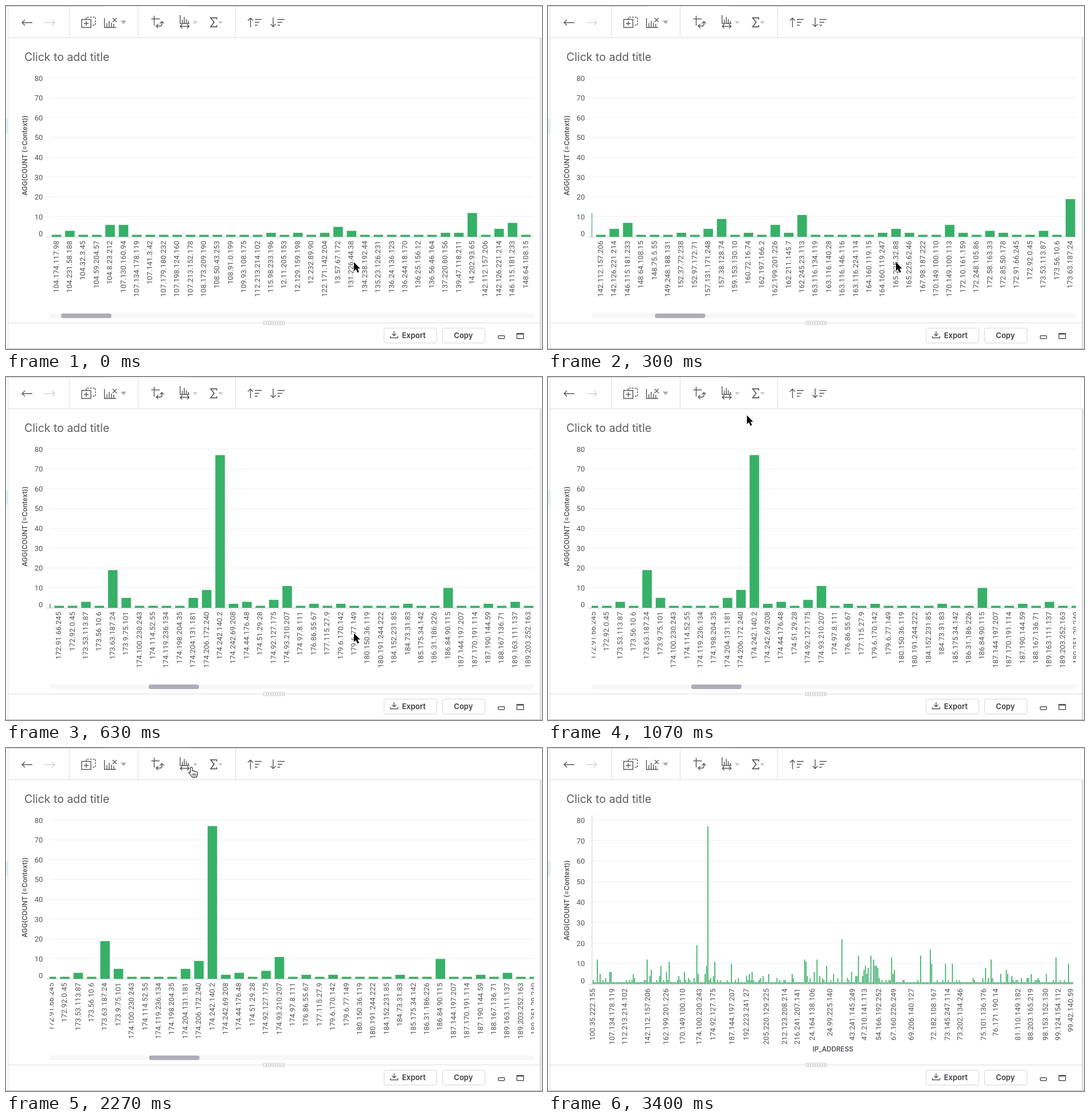
An HTML page for the animation above (3.92 s loop, 935 by 599 pixels).

```html
<!DOCTYPE html>
<html lang="en">
<head>
<meta charset="utf-8">
<title>Bar chart fit</title>
<style>
  html, body { margin: 0; width: 100%; height: 100%; overflow: hidden; background: #fff; }
  svg { display: block; width: 100vw; height: 100vh; }
  .num { font: 13px Roboto, Arial, sans-serif; fill: #55565d; }
  .axis { font: 600 11.6px Inter, Arial, sans-serif; fill: #55565d; text-anchor: middle; }
  .btn { font: 600 13px Inter, Arial, sans-serif; fill: #3c3d44; }
  .title { font: 19.5px Inter, Arial, sans-serif; fill: #5d5e66; }
  .end { text-anchor: end; }
  .icon { fill: none; stroke: #55565d; stroke-width: 1.4; }
  .rule { stroke: #dedee1; }
  .grid { stroke: #f0f0f2; }
  .base { stroke: #cdced2; }
  .box { fill: #fff; stroke: #d6d6da; }
</style>
</head>
<body>
<svg viewBox="0 0 935 599" preserveAspectRatio="none">
  <defs>
    <clipPath id="plot"><rect x="76" y="100" width="845" height="430"/></clipPath>
  </defs>
  <rect width="935" height="599" fill="#fff"/>

  <g id="frame">
    <rect y="197" width="3" height="26" fill="#e2f0f8"/>
    <path class="rule" d="M3.5 1V599M3 55.5H935M110.5 1V55M230.5 1V55M400.5 1V55M3 553.5H932"/>
    <rect x="931" y="56" width="3" height="543" fill="#dcdce0"/>
    <path d="M0 .5H173M319 .5H935" stroke="#cdcdd1"/>
    <path d="M173 .5H319" stroke="#e6e6e9"/>
    <path d="M0 598.5H935" stroke="#b9b9be"/>
  </g>

  <g class="icon">
    <path d="M46 29H28M33 24L28 29L33 34"/>
    <path d="M67 29H85M80 24L85 29L80 34" stroke="#d3d3d7"/>
    <path d="M132 23.5H148V37.5H132ZM140 26.5V34.5M136 30.5H144"/>
    <path d="M140 23V19.5H156V33.5H149" stroke-dasharray="3 2"/>
    <path d="M171.7 21V37.5H192M176 37V30M180 37V26M184 37V29M188 37V31M186 21L193 28M193 21L186 28"/>
    <path d="M258.5 17V34M253.5 22.5H268M262 35H269Q272 35 272 32V27M265.5 31.5L262 35L265.5 38.5M268.5 30.5L272 27L275.5 30.5"/>
    <path d="M303.7 16V30.5H320M307.5 30V24M311 30V19M314.5 30V23M318 30V26M304 35.5H319.5M307.5 32L304 35.5L307.5 39M316 32L319.5 35.5L316 39"/>
    <path d="M367.5 23.5V20.7H357L363 28.5L357 36.3H367.5V33.5" stroke-width="1.7"/>
    <path d="M426.5 37V21M422 25.5L426.5 21L431 25.5M434 23.5H446M434 28.5H442M434 33.5H439"/>
    <path d="M466 20V36M461.5 31.5L466 36L470.5 31.5M473.5 23.5H486M473.5 28.5H482M473.5 33.5H478"/>
    <path d="M200 25.5H210L205 31.5Z" fill="#a9a9af" stroke="none"/>
    <path d="M326 26.5H334L330 31.5ZM370 26.5H378L374 31.5Z" fill="#c6c6cb" stroke="none"/>
  </g>

  <text class="title" x="32" y="95.8">Click to add title</text>

  <g id="wide">
    <g id="wideGrid"></g>
    <g clip-path="url(#plot)"><g id="strip"></g></g>
    <path class="base" d="M70 403.5H920"/>
    <text class="axis" transform="translate(37 261) rotate(-90)">AGG(COUNT (=Context))</text>
    <rect x="76" y="537" width="845" height="8" fill="#f7f7f8"/>
    <rect id="thumb" y="537" width="88" height="8" rx="4" fill="#aeaeb9"/>
  </g>

  <g id="fit">
    <g id="fitGrid"></g>
    <g id="fitBars"></g>
    <path class="base" d="M70 412.5H916M76.8 117V413"/>
    <text class="axis" transform="translate(37 266) rotate(-90)">AGG(COUNT (=Context))</text>
    <text class="axis" x="497" y="529.5">IP_ADDRESS</text>
  </g>

  <g id="footer">
    <rect x="449.5" y="550.5" width="36" height="6" fill="#fff" stroke="#c9c9ce"/>
    <path d="M452.5 553.5H484" stroke="#b4b4ba" stroke-width="2" stroke-dasharray="2.5 1.6"/>
    <rect class="box" x="659.5" y="562.5" width="92" height="26" rx="3"/>
    <rect class="box" x="761.5" y="562.5" width="74" height="26" rx="3"/>
    <path class="icon" d="M677 568V576M673.5 572.5L677 576L680.5 572.5M670.5 576.5V579.5H683.5V576.5"/>
    <text class="btn" x="690.7" y="580.3">Export</text>
    <text class="btn" x="781.3" y="580.3">Copy</text>
    <rect class="icon" x="858.7" y="575.7" width="11" height="5" rx="1"/>
    <path class="icon" d="M891.2 571.7H902.8V580.8H891.2ZM891 573H903"/>
  </g>

  <path id="arrow" d="M0 0V15.2L3.5 12L6.2 18.2L8.8 17L6.1 11H10.8Z" stroke="#fff" stroke-width="1" paint-order="stroke"/>
  <path id="hand" d="M-1.7 1Q0 -1.5 1.7 1V6.5Q3.5 5.5 4.6 7Q6.4 6.2 7.4 7.8Q10 7.2 10.6 9.5V13L9 17.3H1.2Q-.5 14-4.3 9.8Q-4.2 7.2-1.7 9.2ZM2.6 11V15M5 11V15M7.4 11V15" fill="#fff" stroke="#222" stroke-width="1.1" stroke-linejoin="round"/>
</svg>

<script>
const LOOP = 3920, STEP = 100 / 3, FIT_AT = 2660;
const COUNT = 348, FIRST = 8, PITCH = 23.4, LEFT = 76.5;
const GREEN = '#37b068';

// Every bar is 1 unless listed here under its height.
const heights = {
  2: [0, 7, 24, 26, 28, 37, 38, 46, 51, 54, 61, 63, 67, 70, 84, 90, 92, 97, 103, 112, 114, 116, 120, 135, 138, 139,
      167, 172, 185, 209, 212, 214, 215, 224, 225, 235, 249, 253, 257, 263, 265, 276, 304, 306, 307, 320, 321, 323, 333, 338, 341],
  3: [9, 30, 69, 73, 85, 105, 121, 133, 145, 157, 166, 177, 184, 207, 275, 282, 286, 289, 310, 314, 315, 322],
  4: [41, 48, 62, 87, 111, 123, 155, 164, 190, 191, 195, 303],
  5: [5, 29, 76, 81, 113, 127, 144, 174, 198, 217, 295, 300, 317, 328],
  6: [12, 13, 53, 66, 115, 160, 187],
  7: [42, 196, 218, 299],
  8: [199, 206, 284],
  9: [49, 82, 169, 197, 204, 205],
  10: [100, 245, 255, 260, 344],
  11: [55, 88, 154],
  12: [3, 39, 153, 162, 203, 288],
  13: [216, 335], 14: [192, 201, 237], 17: [244], 19: [75], 22: [180], 77: [83]
};
const values = Array(COUNT).fill(1);
for (const h in heights) heights[h].forEach(i => values[i] = +h);

const names = `104.174.117.98 104.231.58.188 104.32.3.45 104.59.204.57 104.8.23.212 107.130.160.94
107.134.178.119 107.141.3.42 107.179.180.232 107.198.124.160 107.213.152.178 108.173.209.190 108.50.43.253
108.91.0.199 109.93.108.175 112.213.214.102 115.98.233.196 12.11.205.153 12.129.159.198 12.232.89.90
122.171.142.204 13.57.67.172 131.226.44.38 134.238.192.44 135.23.126.231 136.24.136.123 136.244.18.170
136.25.156.12 136.56.46.164 137.220.80.156 139.47.118.211 14.202.93.65 142.112.157.206 142.126.221.214
146.115.181.233 148.64.108.15 148.75.5.55 149.248.188.131 152.37.72.238 152.97.172.71 157.131.171.248
157.38.128.74 159.153.130.10 160.72.16.74 162.197.166.2 162.199.201.226 162.211.145.7 162.245.23.113
163.116.134.119 163.116.140.28 163.116.146.116 163.116.224.114 164.160.119.15 164.160.119.247 165.225.32.88
165.225.62.46 167.98.187.222 170.149.100.110 170.149.100.113 172.10.161.159 172.248.105.86 172.58.163.33
172.85.50.178 172.91.66.245 172.92.0.45 173.53.113.87 173.56.10.6 173.63.187.24 173.9.75.101 174.100.230.243
174.114.52.55 174.119.236.134 174.198.204.35 174.204.131.181 174.206.172.240 174.242.140.2 174.242.69.208
174.44.176.48 174.51.29.28 174.92.127.175 174.93.210.207 174.97.8.111 176.86.55.67 177.115.27.9 179.6.170.142
179.6.77.149 180.150.36.119 180.191.244.222 184.152.231.85 184.73.31.83 185.175.34.142 186.31.186.226
186.84.90.115 187.144.197.207 187.170.191.114 187.190.144.59 188.167.136.71 189.163.111.137 189.203.252.163
189.251.29.249`.split(/\s+/);

const fitNames = {
  78: '100.35.222.155', 112: '107.134.178.119', 134: '112.213.214.102', 174: '142.112.157.206',
  206: '162.199.201.226', 235: '170.149.100.110', 264: '174.100.230.243', 288: '174.92.127.175',
  321: '187.144.197.207', 346: '192.223.241.27', 381: '205.220.129.225', 413: '212.123.208.214',
  435: '216.241.207.141', 461: '24.164.138.106', 492: '24.99.225.140', 531: '43.241.145.249',
  552: '47.210.141.113', 577: '54.166.192.252', 603: '67.160.226.249', 634: '69.206.140.127',
  673: '72.182.108.167', 697: '73.145.247.114', 719: '73.202.134.246', 760: '75.101.136.176',
  781: '76.171.190.14', 820: '81.110.149.182', 842: '88.203.165.219', 868: '98.153.152.130',
  890: '99.124.154.112', 912: '99.42.140.59'
};

const $ = id => document.getElementById(id);

function add(parent, tag, attrs, text) {
  const el = document.createElementNS('http://www.w3.org/2000/svg', tag);
  for (const k in attrs) el.setAttribute(k, attrs[k]);
  if (text) el.textContent = text;
  return parent.appendChild(el);
}

function grid(parent, zero, unit, right) {
  for (let v = 0; v <= 80; v += 10) {
    const y = zero - v * unit;
    if (v) add(parent, 'path', { class: 'grid', d: `M69 ${Math.round(y) - .5}H74M77 ${Math.round(y) - .5}H${right}` });
    add(parent, 'text', { class: 'num end', x: 64.3, y: (v ? y : zero - 6) + 4.6 }, String(v));
  }
}

function bar(parent, x, w, zero, h) {
  add(parent, 'rect', { x: x - w / 2, y: zero - h, width: w, height: h, fill: GREEN });
}

function label(parent, x, y, text) {
  add(parent, 'text', { class: 'num end', transform: `translate(${x + 4.4} ${y}) rotate(-90)` }, text);
}

grid($('wideGrid'), 403, 3.4625, 920);
names.forEach((name, k) => {
  const i = k + FIRST, x = LEFT + (i + .5) * PITCH;
  bar($('strip'), x, 16.6, 403, values[i] * 3.4625);
  label($('strip'), x - .8, 410, name);
});

grid($('fitGrid'), 412.5, 3.58, 916);
values.forEach((v, i) => bar($('fitBars'), 78.9 + i * 2.41, 1.7, 412.5, v * 3.58));
for (const x in fitNames) label($('fitBars'), +x, 420, fitNames[x]);

// Monotone cubic through [time, value] keys, coming to rest at the last.
function glide(keys, t) {
  const n = keys.length - 1;
  if (t >= keys[n][0]) return keys[n][1];
  const rate = i => (keys[i + 1][1] - keys[i][1]) / (keys[i + 1][0] - keys[i][0]);
  const slope = i => {
    if (i === 0) return rate(0);
    if (i === n) return 0;
    const a = rate(i - 1), b = rate(i);
    return 2 * a * b / (a + b);
  };
  let i = 0;
  while (t >= keys[i + 1][0]) i++;
  const [t0, v0] = keys[i], [t1, v1] = keys[i + 1];
  const d = t1 - t0, u = (t - t0) / d, w = 1 - u;
  return v0 * w * w * (1 + 2 * u) + v1 * u * u * (1 + 2 * w) + d * u * w * (slope(i) * w - slope(i + 1) * u);
}

const scrollKeys = [[0, 187.4], [300, 931.9], [467, 1416.9], [633, 1656.9], [1067, 1670.4]];
const thumbKeys = [[0, 96], [300, 186.5], [467, 228], [633, 248.8], [1067, 249.6]];
const pointerKeys = [
  [633, 607, 447.5], [1067, 347, 67], [1300, 331, 29], [1667, 331, 29], [1700, 325, 29], [1900, 325, 29],
  [1967, 320, 28], [2167, 320, 28], [2533, 338.5, 58.5], [3200, 338.5, 58.5], [3233, 341, 59.5],
  [3333, 341, 59.5], [3367, 491, 4]
];

function pointer(t) {
  const next = pointerKeys.findIndex(k => k[0] > t);
  if (next === 0) return pointerKeys[0].slice(1);
  if (next < 0) return pointerKeys[pointerKeys.length - 1].slice(1);
  const a = pointerKeys[next - 1], b = pointerKeys[next];
  const u = (t - a[0]) / (b[0] - a[0]), e = u * u * (3 - 2 * u);
  return [a[1] + (b[1] - a[1]) * e, a[2] + (b[2] - a[2]) * e];
}

function show(id, on) { $(id).style.display = on ? '' : 'none'; }

function draw(time) {
  const t = Math.floor((time + 4) / STEP) * STEP;
  const fitted = t >= FIT_AT;
  show('wide', !fitted);
  show('fit', fitted);
  $('strip').setAttribute('transform', `translate(${-glide(scrollKeys, t)} 0)`);
  $('thumb').setAttribute('x', glide(thumbKeys, t));

  const [x, y] = pointer(t);
  const overButton = t > 1150 && t < 2400 && y < 48;
  show('hand', overButton);
  show('arrow', !overButton && t < 3390);
  for (const id of ['hand', 'arrow']) $(id).setAttribute('transform', `translate(${x} ${y})`);
}

const start = performance.now();
function tick() {
  draw((performance.now() - start) % LOOP);
  requestAnimationFrame(tick);
}
tick();
</script>
</body>
</html>
```
